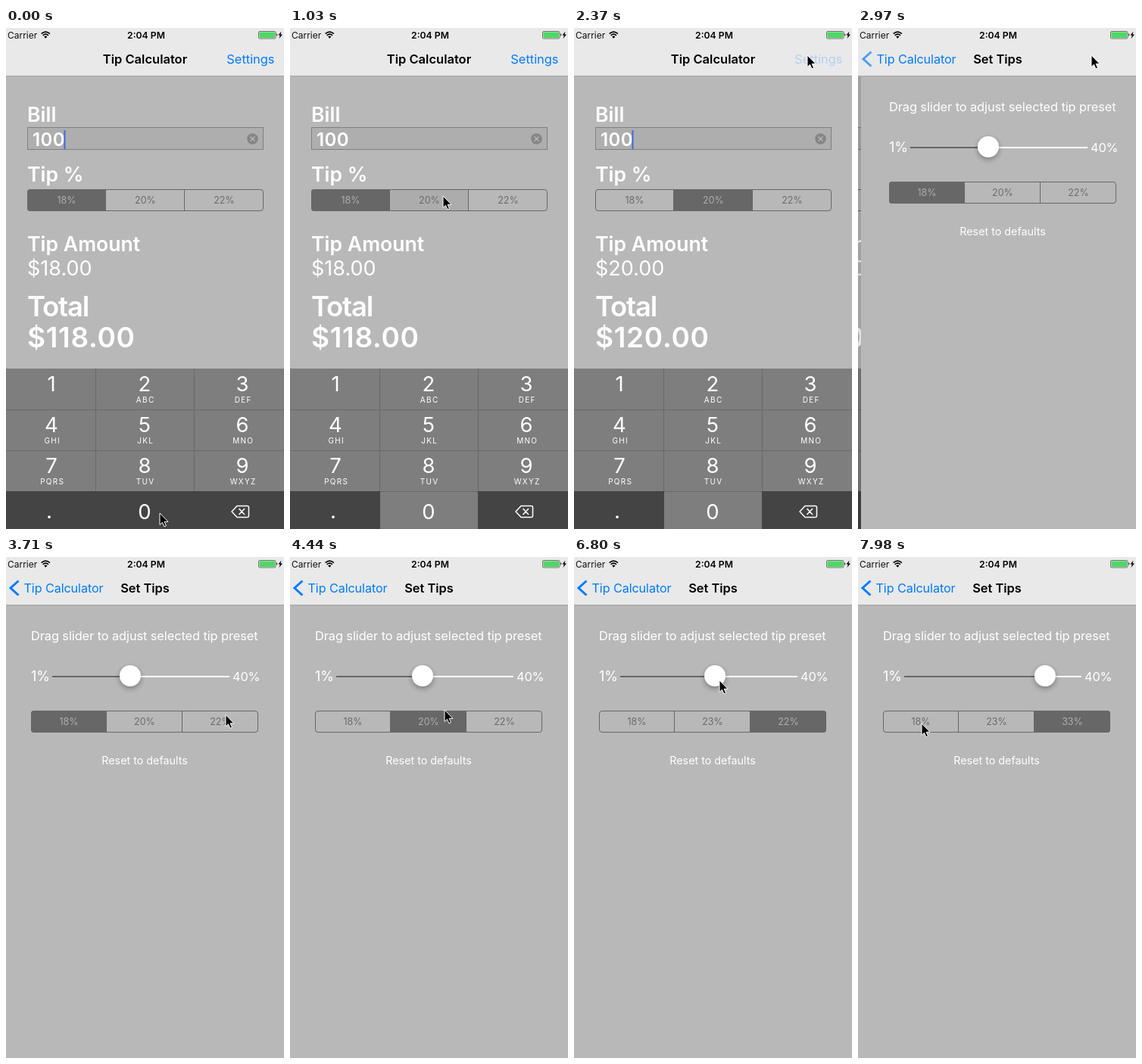
An HTML page for the animation above (8 s loop, 367 px wide and 662 px high).

```html
<!DOCTYPE html>
<html lang="en">
<head>
<meta charset="utf-8">
<title>Tip Calculator</title>
<style>
html, body { margin: 0; width: 100%; height: 100%; overflow: hidden; background: #b8b8b8; }
svg { display: block; width: 367px; height: 662px; font-family: Inter, "Open Sans", sans-serif; }
</style>
</head>
<body>
<svg id="stage" viewBox="0 0 367 662"></svg>
<script>
const LOOP = 8000, TICK = 147.8;
const BLUE = '#007aff', DARK = '#676767', BG = '#b8b8b8';

const text = (s, x, y, size, { fill = '#fff', weight = 400, anchor = 'start', gap = 0, id = '' } = {}) =>
  `<text id="${id}" x="${x}" y="${y}" font-size="${size}" fill="${fill}" font-weight="${weight}"
    text-anchor="${anchor}" letter-spacing="${gap}">${s}</text>`;
const rect = (x, y, w, h, fill, more = '') =>
  `<rect x="${x}" y="${y}" width="${w}" height="${h}" fill="${fill}" ${more}/>`;

// Three-part selector with a highlight and a label per part
function segments(id, x, y, width, labels) {
  const part = width / 3;
  const cells = labels.map((label, i) =>
    rect(x + part * i, y, part, 29, DARK, `id="${id}Fill${i}" clip-path="url(#${id}Clip)"`) +
    text(label, x + part * (i + 0.5), y + 18.6, 12.5, { anchor: 'middle', id: `${id}Label${i}` }));
  const lines = [1, 2].map(i => rect(Math.round(x + part * i) - 1, y, 1, 29, DARK));
  return `<clipPath id="${id}Clip">${rect(x, y, width, 29, '#000', 'rx="4"')}</clipPath>` +
    cells.join('') + lines.join('') +
    rect(x + 0.5, y + 0.5, width - 1, 28, 'none', `rx="3.5" stroke="${DARK}"`);
}

function keypad() {
  const letters = ['', 'ABC', 'DEF', 'GHI', 'JKL', 'MNO', 'PQRS', 'TUV', 'WXYZ'];
  const centers = [60, 183, 312];
  let out = rect(0, 450, 367, 212, '#7e7e7e');
  for (const y of [504, 558, 612]) out += rect(0, y, 367, 1, '#696969');
  for (const x of [118, 248]) out += rect(x, 450, 1, 212, '#696969');
  letters.forEach((word, i) => {
    const x = centers[i % 3], y = 450 + 54 * Math.floor(i / 3);
    out += text(i + 1, x, y + 30, 27.5, { anchor: 'middle' }) +
      text(word, x + 1.2, y + 45, 10, { anchor: 'middle', gap: 1.3 });
  });
  return out + rect(0, 612, 119, 50, '#444') + rect(248, 612, 119, 50, '#444') +
    rect(119, 612, 129, 50, '#444', 'id="zeroKey"') +
    text('.', 57, 648, 28, { anchor: 'middle' }) +
    text('0', 183, 649, 27.5, { anchor: 'middle' }) +
    `<path d="M298 639l7-7.500h13.500q2 0 2 2v11q0 2-2 2h-13.500zM307.500 635l7.500 8m0-8l-7.500 8"
      fill="none" stroke="#fff" stroke-width="1.500" stroke-linejoin="round"/>`;
}

const heading = { weight: 600 };
const calculator = `<g id="calculator">` + rect(0, 63, 367, 599, BG) +
  text('Bill', 28, 124, 26.6, heading) +
  rect(28.5, 131.5, 311, 29, '#aeaeae', 'stroke="#808080"') +
  text('100', 35, 156, 24, { weight: 600, gap: 0.4 }) +
  rect(76.5, 135, 2, 25, '#436be0', 'id="caret"') +
  `<circle cx="325.500" cy="146.500" r="7.300" fill="#868686"/>
   <path d="M322.500 143.500l6 6m0-6l-6 6" stroke="#bcbcbc" stroke-width="1.200"/>` +
  text('Tip %', 28, 203, 26.6, heading) +
  segments('main', 28, 213, 312, ['18%', '20%', '22%']) +
  text('Tip Amount', 28, 295, 26.6, heading) +
  text('', 28, 327, 27, { id: 'tip' }) +
  text('Total', 28, 380.5, 36.5, { weight: 600, gap: -1.2 }) +
  text('', 28, 421.5, 37, { weight: 600, gap: 0.7, id: 'total' }) +
  keypad() + rect(0, 63, 367, 599, '#000', 'id="dim" opacity="0.12"') + `</g>`;

const presets = `<g id="presets">` + rect(0, 63, 367, 599, BG) + `<g id="content">` +
  text('Drag slider to adjust selected tip preset', 33, 109.5, 16.4, { gap: -0.1 }) +
  text('1%', 33, 164, 18) + text('40%', 299, 163.5, 16.4, { gap: -0.2 }) +
  rect(61, 157, 234, 2, '#fff') + rect(61, 157, 100, 2, DARK, 'id="track"') +
  `<g id="thumb"><circle cy="160" r="20" fill="url(#halo)"/>
   <circle cy="159.500" r="14" opacity=".2" filter="url(#soft)"/>
   <circle cy="157" r="14" fill="#fff"/></g>` +
  segments('set', 33, 203, 300, ['18%', '20%', '22%']) +
  text('Reset to defaults', 183, 273.5, 14.3, { anchor: 'middle' }) + `</g></g>`;

const semi = { fill: '#000', weight: 600 };
const bars = rect(0, 0, 367, 63, '#e9e9e9') + rect(0, 63, 367, 1, '#a2a2a2') +
  text('Carrier', 2, 13.5, 12, { fill: '#111' }) +
  `<g fill="none" stroke="#000" stroke-width="1.700"><path d="M46.700 7.600q5.600-5 11.200 0M48.700 9.800q3.600-3.200 7.200 0"/></g>
   <path d="M50.200 11.500q2.100-1.800 4.200 0l-2.100 2.200z"/>` +
  text('2:04 PM', 185, 13.5, 12.2, { ...semi, anchor: 'middle' }) +
  rect(333.5, 4.5, 22.5, 9.5, '#e9e9e9', 'rx="1.500" stroke="#555" stroke-width=".8"') +
  rect(334.5, 5.5, 20.5, 7.5, '#4cd964') + rect(356.8, 7.5, 1.5, 3, '#555', 'rx=".7"') +
  `<path d="M363.500 4.500l-4 5h2.300l-1.300 4.500 4.500-5.500h-2.500z"/>
   <g id="calcBar">` +
  text('Tip Calculator', 183.5, 47, 16.5, { ...semi, anchor: 'middle' }) +
  text('Settings', 354.5, 47, 16.4, { fill: BLUE, anchor: 'end', id: 'settings' }) +
  `</g><g id="setBar"><path id="chevron" d="M16.500 31.500L6 41l10.500 9.500" fill="none" stroke="${BLUE}" stroke-width="3"/>` +
  text('Tip Calculator', 23.5, 47, 16.2, { fill: BLUE, gap: -0.1 }) +
  text('Set Tips', 183.5, 47, 16.4, { ...semi, anchor: 'middle' }) + `</g>`;

const $ = id => document.getElementById(id);
$('stage').innerHTML = `<defs><filter id="soft" x="-50%" y="-50%" width="200%" height="200%"><feGaussianBlur stdDeviation="2"/></filter>
  <radialGradient id="halo"><stop offset=".6" stop-opacity=".08"/><stop offset="1" stop-opacity=".02"/></radialGradient></defs>` +
  calculator + presets + bars +
  `<path id="pointer" d="M0 0V15.500L3.500 12.300 5.900 17.800 8.500 16.700 6.100 11.300H11Z" stroke="#fff" stroke-width="1"/>`;

// Pointer path: tick, x, y
const path = [
  [1, 203, 641], [2, 215, 615], [3, 275, 500], [4, 293, 400], [5, 265, 300], [6, 220, 240], [7, 202, 222],
  [10, 202, 222], [11, 206, 215], [13, 270, 80], [14, 300, 12], [15, 306, 30], [16, 308, 36],
  [20, 308, 36], [21, 309, 42], [22, 312, 120], [23, 310, 205], [24, 310, 205], [26, 270, 212], [28, 212, 204],
  [29, 204, 202], [30, 204, 202], [32, 180, 163], [34, 180, 163], [38, 196, 162], [39, 228, 195], [40, 258, 220],
  [42, 258, 220], [45, 192, 163], [46, 192, 163], [50, 252, 163], [51, 225, 180], [53, 104, 218], [54, 84, 220]
];

function along(keys, n, col = 1) {
  const i = keys.findIndex(k => k[0] >= n);
  if (i < 0) return keys[keys.length - 1][col];
  if (i === 0) return keys[0][col];
  const a = keys[i - 1], b = keys[i];
  return a[col] + (b[col] - a[col]) * (n - a[0]) / (b[0] - a[0]);
}

// A pressed part is tinted before it becomes the selected one
function paintSegments(id, position, pressed = -1) {
  for (let i = 0; i < 3; i++) {
    const level = Math.max(i === pressed ? 0.14 : 0, 1 - Math.abs(position - i));
    $(`${id}Fill${i}`).setAttribute('opacity', level);
    $(`${id}Label${i}`).setAttribute('fill', level > 0.5 ? '#adadad' : '#6c6c6c');
  }
}

const show = (id, on) => $(id).setAttribute('visibility', on ? 'visible' : 'hidden');
const move = (id, x, y = 0) => $(id).setAttribute('transform', `translate(${x} ${y})`);

function draw(n) {
  const pushed = n >= 20;
  const edge = along([[20, 4], [21, 1], [22, 0]], n);

  show('zeroKey', n < 1);
  show('caret', n < 4 || (n >= 8 && n < 11) || n >= 14);
  paintSegments('main', along([[7, 0], [9, 1]], n), n === 7 ? 1 : -1);
  const tip = n < 8 ? 18 : 20;
  $('tip').textContent = `$${tip}.00`;
  $('total').textContent = `$${100 + tip}.00`;
  $('settings').setAttribute('opacity', n >= 16 ? 0.22 : 1);

  move('calculator', pushed ? -0.3 * (367 - edge) : 0);
  for (const id of ['presets', 'setBar', 'dim']) show(id, pushed);
  show('calcBar', !pushed);
  move('presets', edge);
  move('content', edge);
  move('setBar', edge / 4);
  $('chevron').setAttribute('opacity', 1 - edge * 0.08);

  const second = along([[34, 20], [38, 23]], n);
  const third = along([[46, 22], [50, 33]], n);
  const value = n < 29 ? 18 : n < 42 ? second : third;
  const x = 175 + (value - 20) * 5.53;
  move('thumb', x);
  $('track').setAttribute('width', x - 61);
  paintSegments('set', along([[28, 0], [30, 1], [41, 1], [43, 2]], n));
  $('setLabel1').textContent = Math.round(second) + '%';
  $('setLabel2').textContent = Math.round(third) + '%';

  move('pointer', along(path, n), along(path, n, 2));
}

function frame() {
  const t = performance.now() % LOOP;
  draw(Math.floor((t + 10) / TICK));
  requestAnimationFrame(frame);
}
frame();
</script>
</body>
</html>
```
